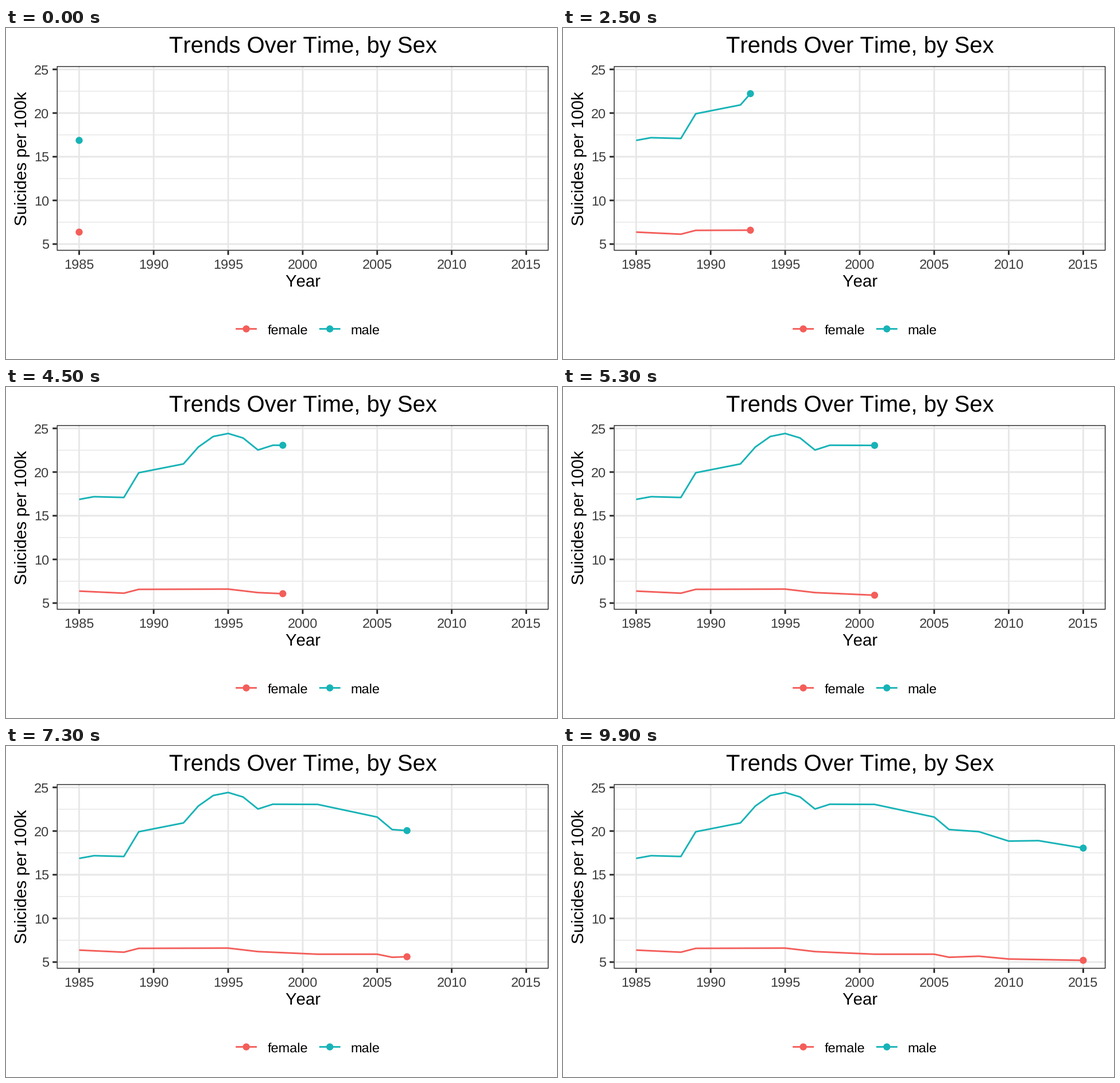
These frames come from a looping animation (960 by 576 pixels, 10 s). A matplotlib script:

```python
import numpy as np
import matplotlib.pyplot as plt
from matplotlib.animation import FuncAnimation
from matplotlib.patches import Circle, Rectangle

plt.rcParams.update({
    "font.family": "Liberation Sans",
    "text.hinting": "none",
    "text.kerning_factor": 6,
    "toolbar": "None",
})

W, H, FRAMES, INTERVAL = 960, 576, 100, 100
PT = 192 / 72  # pixels per point of the chart's type
TITLE, BODY, SMALL = 15 * PT, 11 * PT, 8.8 * PT
TICK, GAP = 2.75 * PT, 2.2 * PT
LEFT, RIGHT, TOP, BOTTOM = 88.5, 945.33, 66.4, 387.5
MID_X, MID_Y = (LEFT + RIGHT) / 2, (TOP + BOTTOM) / 2
RED, TEAL = "#F35E5A", "#17B3B7"
GRID, DARK, LABEL = "#E7E7E7", "#242424", "#3D3D3D"
THICK, THIN, RADIUS = 2.85, 1.42, 6.15

FIRST, LAST = 1985, 2015
YEARS = np.arange(FIRST, LAST + 1)
# Each year is reached on a whole frame, so the pace varies slightly.
YEAR_FRAMES = np.round((YEARS - FIRST) * (FRAMES - 1) / (LAST - FIRST))


def px(year):
    # 5 % of the year range is left free at either side.
    return LEFT + (RIGHT - LEFT) * (year - FIRST + 1.5) / 33


def py(rate):
    return 452 - 15.2 * rate


def trend(turns):
    """Yearly rates on straight runs between turning points."""
    return np.interp(YEARS, list(turns), list(turns.values()))


female = trend({1985: 6.37, 1988: 6.13, 1989: 6.57, 1995: 6.6, 1997: 6.2,
                2001: 5.9, 2005: 5.9, 2006: 5.55, 2008: 5.67, 2010: 5.35,
                2015: 5.2})
male = trend({1985: 16.87, 1986: 17.18, 1988: 17.09, 1989: 19.92, 1992: 20.93,
              1997: 22.48, 1998: 23.07, 2001: 23.05, 2005: 21.6, 2006: 20.17,
              2008: 19.93, 2010: 18.85, 2012: 18.9, 2015: 18.05})
# Rounded peak of the mid nineties.
male = np.maximum(male, 24.42 - 0.43 * (YEARS - 1994.9) ** 2)

fig = plt.figure(figsize=(W / 72, H / 72), dpi=72, facecolor="white")
ax = fig.add_axes([0, 0, 1, 1])
ax.set(xlim=(0, W), ylim=(H, 0))
ax.axis("off")


def line(xs, ys, color, width, z=1):
    return ax.plot(xs, ys, color=color, lw=width, zorder=z, snap=False,
                   solid_capstyle="butt", solid_joinstyle="round")[0]


def dot(x, y, color):
    return ax.add_patch(Circle((x, y), RADIUS, fc=color, ec="none", zorder=6))


def text(x, y, s, size, color="black", ha="center", **kw):
    ax.text(x, y, s, fontsize=size, color=color, ha=ha, va="baseline", **kw)


def draw_panel():
    for rate in np.arange(7.5, 25, 5):
        line([LEFT, RIGHT], [py(rate)] * 2, GRID, THIN)
    for rate in range(5, 26, 5):
        y = py(rate)
        line([LEFT, RIGHT], [y, y], GRID, THICK, 2)
        line([LEFT - TICK, LEFT], [y, y], DARK, THICK, 2)
        text(LEFT - TICK - GAP, y + 8.6, str(rate), SMALL, LABEL, "right")
    for year in range(FIRST, LAST + 1, 5):
        x = px(year)
        line([x, x], [TOP, BOTTOM], GRID, THICK, 2)
        line([x, x], [BOTTOM, BOTTOM + TICK], DARK, THICK, 2)
        text(x, 419, str(year), SMALL, LABEL)
    half = THIN / 2
    ax.add_patch(Rectangle(
        (LEFT + half, TOP + half), RIGHT - LEFT - THIN, BOTTOM - TOP - THIN,
        fc="none", ec=DARK, lw=THIN, zorder=7, snap=False, joinstyle="miter"))


def draw_titles():
    text(MID_X, 44, "Trends Over Time, by Sex", TITLE)
    text(MID_X, 451, "Year", BODY)
    text(36, MID_Y, "Suicides per 100k", BODY,
         rotation=90, rotation_mode="anchor")


def draw_legend():
    for x, name, color in ((418.6, "female", RED), (564.2, "male", TEAL)):
        line([x - 18.4, x + 18.4], [523.6] * 2, color, THICK, 5)
        dot(x, 523.6, color)
        text(x + 36.7, 533, name, SMALL, ha="left")


draw_panel()
draw_titles()
draw_legend()
series = [(rates, line([], [], color, THICK, 5), dot(0, 0, color))
          for rates, color in ((female, RED), (male, TEAL))]


def update(frame):
    now = np.interp(frame, YEAR_FRAMES, YEARS)
    past = YEARS < now
    xs = px(np.append(YEARS[past], now))
    artists = []
    for rates, trail, head in series:
        ys = py(np.append(rates[past], np.interp(now, YEARS, rates)))
        trail.set_data(xs, ys)
        head.center = xs[-1], ys[-1]
        artists += [trail, head]
    return artists


anim = FuncAnimation(fig, update, frames=FRAMES, interval=INTERVAL,
                     repeat=True, repeat_delay=0, blit=False)
plt.show()
```
